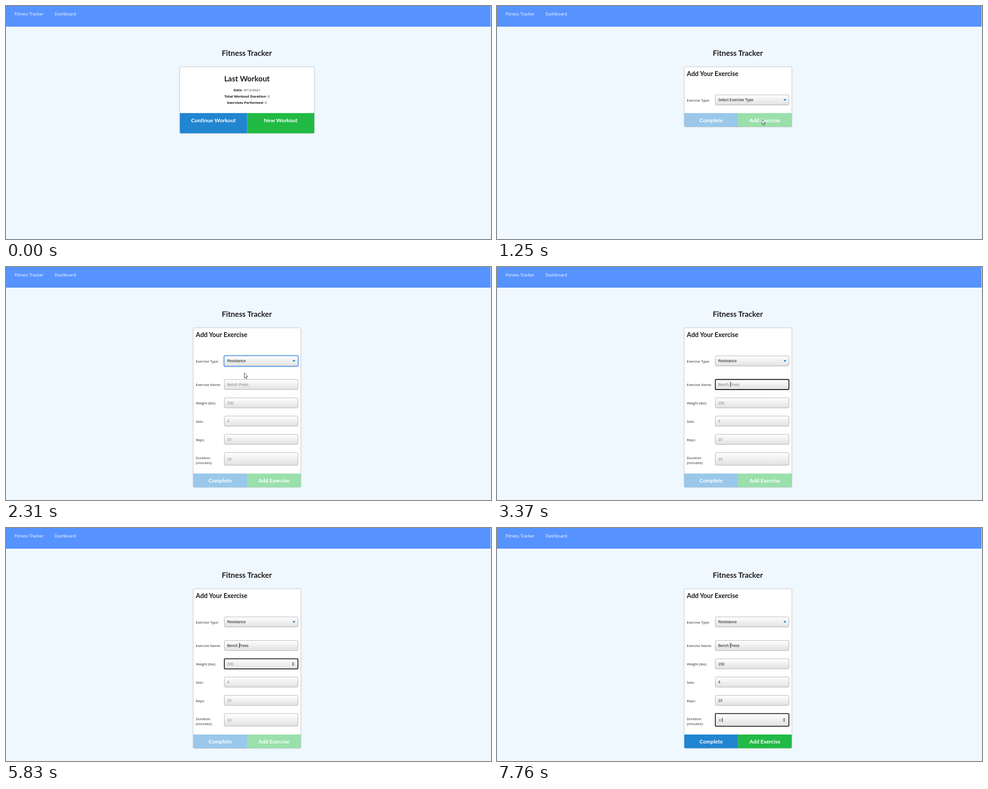
Animation of 1079x519 px, one loop 8000 ms. Source, as an HTML page:

```html
<!DOCTYPE html>
<html lang="en">
<head>
<meta charset="utf-8">
<title>Workout form</title>
<style>
  html, body { margin: 0; width: 100%; height: 100%; overflow: hidden; background: #f0f8ff; }
  svg { display: block; width: 1079px; height: 519px; }
  text { white-space: pre; }
  .ui { font-family: "Open Sans", "Noto Sans", sans-serif; font-size: 7.85px; fill: #222; }
  .nav { font-size: 9.3px; fill: #fff; }
  .head { font-family: Lato, sans-serif; font-weight: 700; fill: #1b1c1d; }
  .field { font-family: "Liberation Sans", Arial, sans-serif; font-size: 8.4px; fill: #1a1a1a; }
  .mid { text-anchor: middle; }
  .b { font-weight: 700; fill: #111; }
  .card { filter: drop-shadow(0 .6px 1.2px #b4b8bc); }
  .popup { filter: drop-shadow(1px 1px 1px #0007); }
</style>
</head>
<body>
<svg viewBox="0 0 1079 519">
  <defs>
    <linearGradient id="face" x2="0" y2="1">
      <stop stop-color="#fff"/>
      <stop offset="1" stop-color="#e1e1e1"/>
    </linearGradient>
  </defs>
  <rect width="1079" height="519" fill="#f0f8ff"/>
  <rect width="1078" height="46" fill="#5793ff"/>
  <rect x="1078" width="1" height="519" fill="#e8eef4"/>
  <text class="ui nav" x="19" y="20.8">Fitness Tracker</text>
  <text class="ui nav" x="108" y="20.8">Dashboard</text>
  <text class="head mid" x="535.8" y="111" font-size="16.8">Fitness Tracker</text>
  <g id="page"></g>
  <g id="pointer"></g>
</svg>
<script>
const LOOP = 8000, STEP = 1000 / 15;
const BLUE = "#2185d0", GREEN = "#21ba45";
const pageLayer = document.getElementById("page");
const pointerLayer = document.getElementById("pointer");
const meter = document.createElement("canvas").getContext("2d");

const FIELDS = [
  { label: ["Exercise Name:"], y: 250.5, h: 22.5, hint: "Bench Press", value: "Bench Press", focus: 2840, blur: 5300,
    keys: [3510, 3770, 3900, 3970, 4170, 4240, 4500, 4630, 4770, 4970, 5100], caretOff: [3370, 3510] },
  { label: ["Weight (lbs):"], y: 291.3, h: 22.5, hint: "200", value: "150", focus: 5300, blur: 6430,
    keys: [5960, 6100, 6230], caretOff: [5830, 5960], number: true },
  { label: ["Sets:"], y: 332, h: 22.5, hint: "4", value: "4", focus: 6430, blur: 7030, keys: [6830], number: true },
  { label: ["Reps:"], y: 372.7, h: 22.5, hint: "10", value: "10", focus: 7030, blur: 7430, keys: [7160, 7300], number: true },
  { label: ["Duration", "(minutes):"], y: 413.4, h: 28.2, hint: "10", value: "10", focus: 7430, blur: LOOP,
    keys: [7630, 7760], number: true, ink: "#2b7653" }
];

// Pointer stops: time, x, y
const STOPS = [
  [120, 1030, 491], [520, 594, 256], [1180, 594, 256], [1580, 543, 214.5],
  [1850, 543, 214.5], [2050, 530, 236], [2380, 530, 236], [2780, 519.5, 261.3]
];
const CLICKS = [[720, 860], [1650, 1780], [2110, 2250], [2840, 2910]];

const during = (t, [from, to]) => t >= from && t < to;
const text = (x, y, str, cls, extra = "") => `<text class="${cls}" x="${x}" y="${y}" ${extra}>${str}</text>`;
const rect = (x, y, w, h, fill, extra = "") =>
  `<rect x="${x}" y="${y}" width="${w}" height="${h}" fill="${fill}" ${extra}/>`;
const path = (d, fill, extra = "") => `<path d="${d}" fill="${fill}" ${extra}/>`;

function card(x, w, bottom) {
  return rect(x, 135.8, w, bottom - 135.8, "#fff", 'class="card" rx="2.5" stroke="#d0d2d4" stroke-width=".7"');
}

function buttons(x, w, top, bottom, labels, colors, opacity = 1) {
  const half = w / 2, r = 2.5, h = bottom - top;
  const left = `M${x} ${top}h${half}v${h}h${r - half}q${-r} 0 ${-r} ${-r}z`;
  const right = `M${x + half} ${top}h${half}v${h - r}q0 ${r} ${-r} ${r}h${r - half}z`;
  const label = (i, cx) => text(cx, top + 20.3, labels[i], "head mid", 'font-size="12" style="fill:#fff"');
  return path(left, colors[0], `opacity="${opacity}"`) + path(right, colors[1], `opacity="${opacity}"`) +
    label(0, x + half / 2) + label(1, x + half * 1.5);
}

function homePage(t) {
  const facts = [["Date", "9/12/2021"], ["Total Workout Duration", "0"], ["Exercises Performed", "0"]];
  const green = t < 520 ? GREEN : t < 720 ? "#16ab39" : "#19a037";
  return card(386.8, 299, 283.4) +
    text(536, 168, "Last Workout", "head mid", 'font-size="16.8"') +
    facts.map(([name, value], i) =>
      text(536.2, 189.8 + i * 14.3, `<tspan class="b">${name}</tspan>: ${value}`, "ui mid")).join("") +
    buttons(386.8, 299, 238.5, 283.4, ["Continue Workout", "New Workout"], [BLUE, green]);
}

function box(y, h, focused) {
  const style = focused ? 'rx="1.8" stroke="#111" stroke-width="1.8"' : 'rx="2.5" stroke="#a6a6a6" stroke-width=".9"';
  return rect(485.7, y, 163.7, h, "url(#face)", style);
}

function spinner(cy) {
  return path(`M636 ${cy - 1}h5.4l-2.7 -2.8zM636 ${cy + 1.2}h5.4l-2.7 2.8z`, "#444");
}

function fieldRow(f, t) {
  const focused = during(t, [f.focus, f.blur]);
  const typed = f.value.slice(0, f.keys.filter(k => k <= t).length);
  const cy = f.y + f.h / 2;
  const firstLine = f.label.length > 1 ? cy + .6 : cy + 3.7;
  let out = f.label.map((line, i) => text(422.3, firstLine + i * 11.3, line, "ui")).join("") + box(f.y, f.h, focused);
  out += typed
    ? text(492, cy + 3.1, typed, "field", f.ink ? `style="fill:${f.ink}"` : "")
    : text(492, cy + 3.1, f.hint, "field", 'style="fill:#858585"');
  if (focused && f.number) out += spinner(cy);
  if (focused && !(f.caretOff && during(t, f.caretOff))) {
    meter.font = '8.4px "Liberation Sans", Arial, sans-serif';
    out += rect(492 + meter.measureText(typed).width, cy - 5, .8, 10, "#111");
  }
  return out;
}

function select(t, chosen) {
  const ring = during(t, [1710, 2840])
    ? rect(484.9, 197.3, 165.3, 24.2, "none", 'rx="3" stroke="#5fa5ee" stroke-width="2"') : "";
  return text(422.3, 213, "Exercise Type:", "ui") + box(198, 22.5, false) + ring +
    text(492, 212.3, chosen ? "Resistance" : "Select Exercise Type", "field") +
    path("M637.2 207.6h6.6l-3.3 3.6z", "#0a78bd");
}

function popup(t) {
  const hover = t >= 1980;
  return rect(485.8, 220.9, 163, 32.8, "#fff", 'class="popup" stroke="#777" stroke-width=".8"') +
    rect(486.2, hover ? 232 : 221.3, 162.2, 10.7, hover ? "#1967d2" : "#c8c8c8") +
    text(492, 229.3, "Select Exercise Type", "field", 'style="fill:#737b7b"') +
    text(492, 240, "Resistance", "field", hover ? 'style="fill:#fff"' : "") +
    text(492, 250.7, "Cardio", "field");
}

function formPage(t) {
  const chosen = t >= 2180;
  const bottom = chosen ? 490.4 : 269;
  const opacity = t < 7630 ? .45 : t < 7700 ? .55 : t < 7760 ? .85 : 1;
  return card(416.7, 239, bottom) +
    text(422.3, 156, "Add Your Exercise", "head", 'font-size="14.4"') +
    select(t, chosen) +
    (chosen ? FIELDS.map(f => fieldRow(f, t)).join("") : "") +
    buttons(416.7, 239, bottom - 30.5, bottom, ["Complete", "Add Exercise"], [BLUE, GREEN], opacity) +
    (during(t, [1710, 2180]) ? popup(t) : "");
}

function pointerAt(t) {
  const now = Math.floor((t + 17) / STEP) * STEP - 13;
  const next = STOPS.findIndex(s => s[0] > now);
  if (next < 0) return STOPS[STOPS.length - 1].slice(1);
  if (next === 0) return STOPS[0].slice(1);
  const [t0, x0, y0] = STOPS[next - 1], [t1, x1, y1] = STOPS[next];
  const p = (now - t0) / (t1 - t0);
  const k = p * p * (3 - 2 * p);
  return [x0 + (x1 - x0) * k, y0 + (y1 - y0) * k];
}

function pointer(t) {
  if (t < 120) return "";
  const [x, y] = pointerAt(t);
  const outline = 'stroke="#222" stroke-width=".8" stroke-linejoin="round"';
  let shape;
  if (during(t, [510, 920])) {
    shape = path("M-1 -2.2Q0 -3.2 1 -2.2V3Q2.3 2.2 3 3.6Q4.3 3 4.7 4.3Q6.2 4 6.2 5.6V8.5L5 12H-.5L-3.8 7Q-3.9 5.2 -1 7Z",
      "#fff", outline) + path("M1 3V6M3 3.8V6.4M4.7 4.5V6.8", "none", 'stroke="#555" stroke-width=".5"');
  } else if (t >= 2640) {
    shape = path("M-1.8 -4.6Q0 -4.6 0 -3.8Q0 -4.6 1.8 -4.6M0 -4V4M-1.8 4.6Q0 4.6 0 3.8Q0 4.6 1.8 4.6", "none",
      'stroke="#222" stroke-width=".9"');
  } else {
    shape = path("M0 0V11.2L2.6 8.9L4.4 13L6.2 12.2L4.4 8.2H7.8Z", "#f6f6f6", outline);
  }
  const halo = CLICKS.some(c => during(t, c)) ? '<circle r="7" fill="#e8e000" opacity=".62"/>' : "";
  return `<g transform="translate(${x.toFixed(2)} ${y.toFixed(2)})">${halo}${shape}</g>`;
}

function update(layer, markup) {
  if (layer.markup !== markup) layer.innerHTML = layer.markup = markup;
}

function draw() {
  const t = performance.now() % LOOP;
  update(pageLayer, t < 920 ? homePage(t) : formPage(t));
  update(pointerLayer, pointer(t));
  requestAnimationFrame(draw);
}
draw();
</script>
</body>
</html>
```
